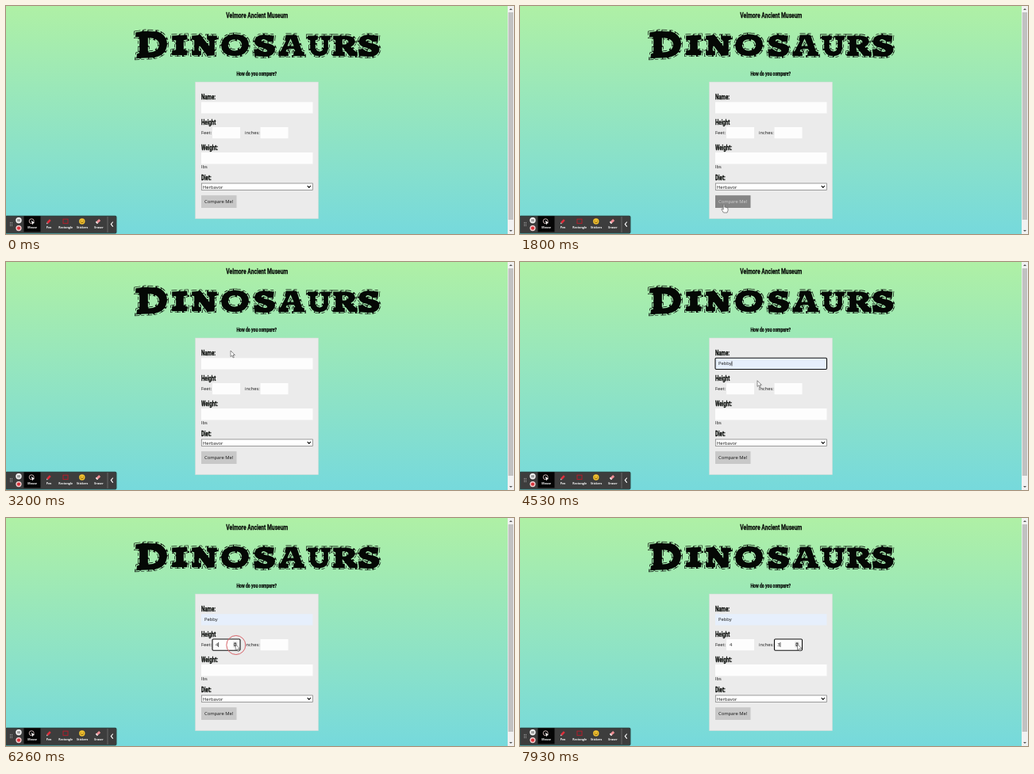
Recreate the animation shown at these times as an HTML page. Size 640 px wide and 288 px high, loop 8 s.

```html
<!DOCTYPE html>
<html lang="en">
<head>
<meta charset="utf-8">
<title>Dinosaurs</title>
<style>
  html, body { margin: 0; width: 100%; height: 100%; overflow: hidden; }
  svg { display: block; width: 640px; height: 288px; }
  text { font: 5.8px "Open Sans", sans-serif; fill: #141414; }
  .head { font: bold 8.4px Roboto, sans-serif; fill: #050805; stroke: #050805; stroke-width: .25; }
  .mid { text-anchor: middle; }
  .tool text { font: 700 3.6px "Open Sans", sans-serif; fill: #fff; text-anchor: middle; }
  .field { fill: #fdfdfd; }
  .line { fill: none; stroke-linecap: round; stroke-linejoin: round; }
</style>
</head>
<body>
<svg viewBox="0 0 640 288">
  <defs>
    <linearGradient id="sky" gradientUnits="userSpaceOnUse" x1="0" y1="0" x2="0" y2="288">
      <stop stop-color="#aff0a5"/><stop offset="1" stop-color="#76d9dc"/>
    </linearGradient>
    <path id="ess" d="M339 37L338 46L331 46Q324 41 323 44Q324 46 332 47Q341 49 340 56Q338 65 326 65L313 64L312 54L319 54Q326 59 329 57Q329 55 321 53Q312 51 313 44Q315 35 328 36Z"/>
    <g id="letters" fill-rule="evenodd">
      <path d="M163 33L176 31L192 32Q205 37 204 50Q202 64 186 66L164 67L165 60L168 59L168 40L163 40ZM180 41L180 58Q192 58 193 49Q192 41 180 41Z"/>
      <path d="M209 37L229 36L230 43L225 44L225 55L230 56L229 63L209 63L209 56L214 55L214 44L209 44Z"/>
      <path d="M234 37L246 36L256 49L256 44L253 43L253 37L267 37L267 43L264 44L264 63L254 64L244 51L244 56L247 57L247 63L234 63L234 57L237 56L237 44L234 43Z"/>
      <path d="M289 35Q307 36 307 49Q306 64 288 64Q271 63 271 50Q272 36 289 35ZM289 43Q281 43 281 50Q282 56 289 56Q297 55 297 49Q296 43 289 43Z"/>
      <use href="#ess"/>
      <path d="M353 36L367 36L374 57L377 58L377 64L362 64L362 58L364 57L363 55L355 55L354 57L357 58L357 64L343 64L343 58L346 57L353 43L351 42ZM359 43L356 50L362 50Z"/>
      <path d="M380 37L394 37L394 43L391 44L391 53Q392 57 396 57Q400 56 400 52L400 44L397 43L397 37L410 37L410 43L407 44L407 54Q406 64 395 64Q384 64 383 54L383 44L380 43Z"/>
      <path d="M412 37L431 37Q441 38 441 46Q440 50 436 52L441 57L444 58L444 64L433 64L425 54L425 57L428 58L428 64L412 64L412 58L415 57L415 44L412 43ZM425 43L425 48Q432 48 431 45Q431 43 425 43Z"/>
      <use href="#ess" x="131.5"/>
    </g>
  </defs>

  <rect width="640" height="288" fill="url(#sky)"/>

  <!-- scrollbar -->
  <rect x="632" width="8" height="288" fill="#f1f1f1"/>
  <rect x="632.8" y="8" width="6.2" height="262" fill="#c1c1c1"/>
  <path d="M634 5l2-2 2 2zM634 283l2 2 2-2z" fill="#555"/>

  <!-- headings -->
  <text class="head mid" style="font-size:9.2px" transform="translate(316.3 15.3) scale(.73 1)">Velmore Ancient Museum</text>
  <g role="img" aria-label="Dinosaurs" transform="translate(-.5 -.2)">
    <use href="#letters" fill="#050805" stroke="#050805" stroke-width="2.6" stroke-dasharray="7 3 4 2"/>
    <use href="#letters" fill="none" stroke="url(#sky)" stroke-width="1.3" stroke-dasharray="9 2 5 1"/>
  </g>
  <text class="head mid" style="font-size:7px" transform="translate(315.8 88.2) scale(.73 1)">How do you compare?</text>

  <!-- form -->
  <rect x="238.5" y="96" width="155" height="172.7" fill="#ebebeb" stroke="#d3dcd6" stroke-width=".5"/>
  <g id="labels"></g>
  <rect id="nameBox" class="field" x="246" y="121.3" width="140.5" height="14.2"/>
  <rect class="field" x="260" y="153" width="35" height="14.2"/>
  <rect class="field" x="320.5" y="153" width="35" height="14.2"/>
  <rect class="field" x="246" y="185" width="140.5" height="14.5"/>
  <text x="246" y="162.3">Feet:</text>
  <text x="301" y="162.3">inches:</text>
  <text x="246" y="205">lbs</text>
  <rect x="246.3" y="224" width="140" height="8.5" fill="#fff" stroke="#767676" stroke-width=".7"/>
  <text x="248" y="230.5">Herbavor</text>
  <path class="line" d="M380 227.3l1.8 2 1.8-2" stroke="#111" stroke-width="1.1"/>
  <rect id="button" x="246" y="239.2" width="44.5" height="15.8"/>
  <text id="buttonText" class="mid" x="268.2" y="249.2">Compare Me!</text>

  <text id="name" x="250" y="130.2"></text>
  <text id="feet" x="264" y="162.3"></text>
  <text id="inches" x="324.3" y="162.3"></text>
  <rect id="focus" rx="1.2" fill="none" stroke="#101010" stroke-width="1.1"/>
  <path id="caret" d="M0 0v6" stroke="#111" stroke-width=".7"/>
  <g id="spin">
    <rect width="5.4" height="7" fill="#dcdcdc"/>
    <path d="M.4 3l2.3-2.2L5 3zM.4 4l2.3 2.2L5 4z" fill="#4a4a4a"/>
  </g>

  <!-- recorder toolbar -->
  <g class="tool">
    <rect x="-1" y="264.8" width="140.5" height="22.6" rx="2" fill="#1c2422" opacity=".8"/>
    <rect x=".8" y="265.8" width="137.6" height="20.4" rx="1" fill="#3d3d3d"/>
    <rect x="22.5" y="265.4" width="21" height="20" fill="#050505"/>
    <path d="M5.5 273v6M7.5 273v6" stroke="#aaa" stroke-dasharray="1 1"/>
    <circle cx="16" cy="270.8" r="3.7" fill="#f4f4f4"/>
    <path d="M15 269.2v3.2M17 269.2v3.2" stroke="#333" stroke-width=".9"/>
    <circle cx="16" cy="280.6" r="3.6" fill="#f0cfcf"/>
    <circle cx="16" cy="280.6" r="2.2" fill="#d8333b"/>
    <circle cx="32.2" cy="271.8" r="3" fill="none" stroke="#efd6d4" stroke-width=".8"/>
    <path d="M31.8 271l4.4 3-2 .4-.7 2z" fill="#fff"/>
    <path d="M52.2 274l3.6-3.8" stroke="#df2f3c" stroke-width="2.6"/>
    <path d="M51 275.3l.4-1.8 1.4 1.4z" fill="#eee"/>
    <rect x="72" y="269.2" width="6" height="5.4" fill="none" stroke="#b01f2c" stroke-width="1"/>
    <circle cx="95.8" cy="272" r="3.7" fill="#f4c430"/>
    <path class="line" d="M94.3 271v.2M97.3 271v.2M93.9 273q1.9 2 3.8 0" stroke="#70480c" stroke-width=".8"/>
    <path d="M114.2 273.8l4-3.6" stroke="#ee8d94" stroke-width="3"/>
    <path d="M113.8 274.2l1.2-1.1" stroke="#eee" stroke-width="3"/>
    <text x="33.3" y="281.4">Mouse</text>
    <text x="54" y="281.4">Pen</text>
    <text x="75.2" y="281.4">Rectangle</text>
    <text x="96.2" y="281.4">Stickers</text>
    <text x="117" y="281.4">Eraser</text>
    <path d="M128 266v20" stroke="#888" stroke-width=".6"/>
    <path class="line" d="M134.5 273l-2.2 2.7 2.2 2.7" stroke="#fff" stroke-width="1.1"/>
  </g>

  <circle id="ring" r="12" fill="none" stroke="#d8646a" stroke-width="1"/>
  <g id="cursor" fill="#fff" stroke="#444" stroke-width=".6" stroke-linejoin="round">
    <path id="arrow" d="M0 0v7.6l1.8-1.6 1.3 2.9 1.2-.5-1.3-2.9h2.4z"/>
    <path id="hand" d="M-.8 1Q0-.3.8 1V4.2Q2 3.6 2.3 4.6Q3.5 4.1 3.8 5.1Q5 4.8 5 6V8.4L4 11H-.6L-3 7Q-3.3 5.8-2 6L-.8 7.2Z"/>
  </g>
</svg>
<script>
const $ = id => document.getElementById(id);
const LOOP = 8000;

$('labels').innerHTML = [['Name:', 117.6], ['Height', 150], ['Weight:', 182], ['Diet:', 220.2]]
  .map(([s, y]) => `<text class="head" transform="translate(246 ${y}) scale(.73 1)">${s}</text>`).join('');

// pointer stops: time, x, y
const path = [
  [0, 150, 295], [60, 150, 295], [880, 257, 250], [2390, 257, 250], [2450, 321, 56], [2660, 321, 56],
  [3130, 283, 112], [3530, 283, 112], [3730, 285, 127], [4000, 285, 127], [4400, 299, 149.8],
  [5000, 299, 149.8], [5400, 289.2, 159.7], [6460, 289.2, 159.7], [6930, 349.5, 159.3], [LOOP, 349.5, 159.3]
];
const feetClicks = [5600, 5800, 6000, 6200], inchClicks = [7130, 7400, 7730];
const clicks = [2380, 3800, ...feetClicks, ...inchClicks];
const fields = {
  name: [246, 121.3, 140.5],
  feet: [260, 153, 35],
  inches: [320.5, 153, 35]
};

function pointer(t) {
  const i = path.findIndex(p => p[0] > t);
  const [t0, x0, y0] = path[i - 1], [t1, x1, y1] = path[i];
  const u = (t - t0) / (t1 - t0), e = u * u * (3 - 2 * u);
  return [x0 + (x1 - x0) * e, y0 + (y1 - y0) * e];
}

const show = (id, on) => $(id).style.display = on ? '' : 'none';
const move = (id, x, y) => $(id).setAttribute('transform', `translate(${x} ${y})`);
const count = (list, t) => list.filter(c => c <= t).length || '';

function draw(t) {
  const [x, y] = pointer(t);
  move('cursor', x, y);
  const hand = t > 840 && t < 2660;
  show('hand', hand);
  show('arrow', !hand);

  const hover = t > 840 && t < 2520, pressed = hover && t >= 2380;
  $('button').style.fill = pressed ? '#777' : hover ? '#858585' : '#c8c8c8';
  $('buttonText').style.fill = pressed ? '#eee' : hover ? '#d0d0d0' : '';

  const filled = t >= 4300;
  $('name').textContent = filled ? 'Pebby' : '';
  $('nameBox').style.fill = filled ? '#e6effc' : '';
  $('feet').textContent = count(feetClicks, t);
  $('inches').textContent = count(inchClicks, t);

  const active = t < 3800 ? '' : t < feetClicks[0] ? 'name' : t < inchClicks[0] ? 'feet' : 'inches';
  show('focus', active);
  show('caret', active);
  if (active) {
    const [fx, fy, w] = fields[active], text = $(active);
    const box = { x: fx, y: fy, width: w, height: 14.2 };
    for (const k in box) $('focus').setAttribute(k, box[k]);
    move('caret', +text.getAttribute('x') + text.getComputedTextLength() + .3, fy + 4);
  }

  const spinX = t >= 5380 && t < 6560 ? 286 : t >= 6860 ? 346.3 : 0;
  show('spin', spinX);
  move('spin', spinX, 156.3);

  const click = clicks.find(c => t >= c && t < c + 160);
  show('ring', click);
  if (click) {
    const [cx, cy] = pointer(click);
    move('ring', cx + .6, cy + .8);
  }
}

function tick() {
  draw(performance.now() % LOOP);
  requestAnimationFrame(tick);
}
tick();
</script>
</body>
</html>
```
